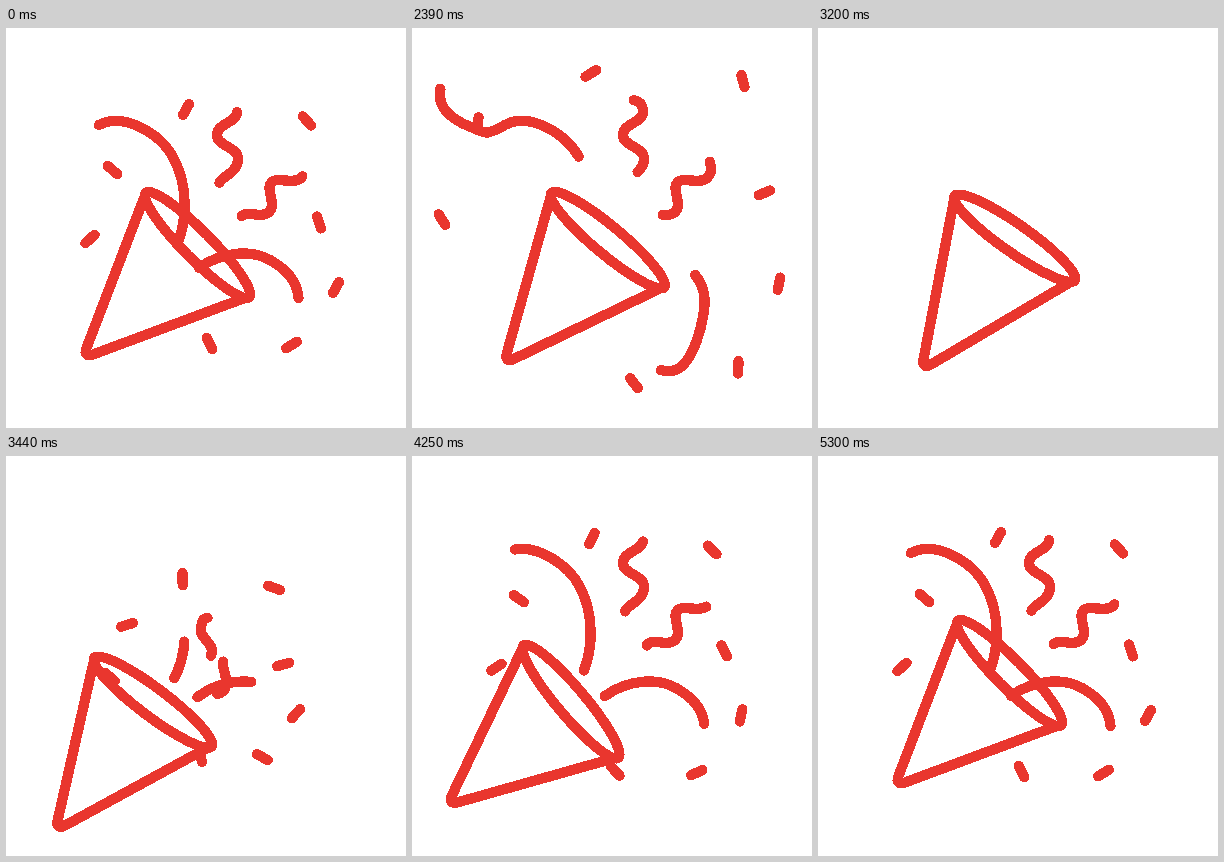
An HTML page for the animation above (5.36 s loop, 400 by 400 pixels).

```html
<!DOCTYPE html>
<html lang="en">
<head>
<meta charset="utf-8">
<title>Party popper</title>
<style>
  html, body { margin: 0; width: 100%; height: 100%; overflow: hidden; background: #fff; }
  svg { display: block; width: 100vw; height: 100vh; shape-rendering: crispEdges; }
  svg * { fill: none; stroke: #e9362e; stroke-width: 10.3; stroke-linecap: round; stroke-linejoin: round; }
</style>
</head>
<body>
<svg id="stage" viewBox="0 0 400 400">
  <g id="cone">
    <path d="M138 170 L80.5 320 C78 326 81 328.8 87 326.5 L240 269.5"/>
    <ellipse cx="191.5" cy="217" rx="73.5" ry="14" transform="rotate(45.2 191.5 217)"/>
  </g>
</svg>
<script>
const LOOP = 5360, START = 2000, FIRE = 3250;
const MUZZLE = [166, 252];
const stage = document.getElementById('stage');
const cone = document.getElementById('cone');

const clamp = (v, lo, hi) => Math.min(hi, Math.max(lo, v));
const mix = (a, b, u) => a + (b - a) * u;
const smooth = (t, from, to) => {
  const u = clamp((t - from) / (to - from), 0, 1);
  return u * u * (3 - 2 * u);
};

// Smooth monotone interpolation through [time, value] keys
function track(keys) {
  const rise = keys.slice(1).map(([t, v], i) => (v - keys[i][1]) / (t - keys[i][0]));
  const slope = keys.map((_, i) => {
    const a = rise[i - 1], b = rise[i];
    return a * b > 0 ? 2 * a * b / (a + b) : 0;
  });
  return t => {
    if (t <= keys[0][0]) return keys[0][1];
    const i = keys.findIndex(k => k[0] > t) - 1;
    if (i < 0) return keys[keys.length - 1][1];
    const [t0, v0] = keys[i], [t1, v1] = keys[i + 1];
    const h = t1 - t0, u = (t - t0) / h, w = 1 - u;
    return v0 * w * w * (1 + 2 * u) + v1 * u * u * (3 - 2 * u)
      + h * u * w * (slope[i] * w - slope[i + 1] * u);
  };
}

function add(tag, attrs) {
  const el = document.createElementNS('http://www.w3.org/2000/svg', tag);
  for (const name in attrs) el.setAttribute(name, attrs[name]);
  return stage.appendChild(el);
}

const show = (el, on) => { el.style.visibility = on ? 'visible' : 'hidden'; };

// Cone: time, dx, dy, degrees for aim, recoil and return
const pose = [
  [2010, 0, 0, 0], [2750, 15, -3, -10.2], [3160, 15, -3, -10.2],
  [3440, -39, 34, -8.2], [3850, -49, 35.5, 6.5], [5000, 0, 0, 0]
];
const [coneX, coneY, coneTurn] = [1, 2, 3].map(c => track(pose.map(k => [k[0], k[c]])));

// Distance still to go after the shot, 1 being the early burst
const landing = track([[FIRE, 4], [3440, 1], [3920, 0.145], [4450, 0]]);

// Streamers slide along fixed paths; [tail, head] points at rest and in the burst
const streamers = [
  {
    d: 'M163 232 Q170 219 172 214 C181 192 182 158 168 131 S116 84 93 97 72 103 62 100 28 86 28 68 34 48 42 41',
    rest: [[172, 214], [93, 97]], burst: [[168, 222], [179, 186]], leave: [62, 100], pace: 0.7
  },
  {
    d: 'M189 243 L193 240 C215 224 245 221 264 232 S291 254 292.5 270 282 343 258 343 234 330 234 324',
    rest: [[193, 240], [292.5, 270]], burst: [[191, 241], [245, 227]], leave: [258, 343], pace: 0.9
  },
  {
    d: 'M205 200 C210 186 193 184 195 172 S198 164 201 162 211 160 214 154 232 144 232 131 211 119 211 107 231 95 231 84 224 73 218 71',
    rest: [[214, 155], [231, 85]], burst: [[205, 200], [201, 162]], leave: [222, 119], pace: 1.2
  },
  {
    d: 'M211 238 C222 236 221 226 219 218 S216 208 217 206 226 202 230 197 234 188 239 186 258 191 264 183 260 162 265 155 288 157 295 150 298 137 297 130',
    rest: [[235, 188], [296, 149]], burst: [[211, 238], [217, 206]], leave: [265, 168], pace: 1
  }
].map(({ d, rest, burst, leave, pace }) => {
  const el = add('path', { d });
  const total = el.getTotalLength();
  const along = ([x, y]) => {
    let best = 0, gap = Infinity;
    for (let n = 0; n <= total; n += 0.5) {
      const p = el.getPointAtLength(n), g = Math.hypot(p.x - x, p.y - y);
      if (g < gap) { gap = g; best = n; }
    }
    return best;
  };
  const ends = rest.map(along), early = burst.map(along);
  const tailOut = track([[START, ends[0]], [2750, along(leave)], [3150, total]]);
  const span = t => {
    if (t < FIRE) return [tailOut(t), mix(ends[1], total, smooth(t, START, 2560))];
    const left = landing(t) ** pace;
    return ends.map((end, i) => Math.max(0, mix(end, early[i], left)));
  };
  return { el, total, span };
});

// Confetti: resting x, y, degrees; spin; where it leaves to
const bits = [
  [180, 81.5, -61, 30, 178, 20],
  [301, 93, 48, 28, 352, 25],
  [106.5, 142, 41, 59, 37, 63],
  [84, 211, -42, -82, -8, 178],
  [313, 194.5, 72, 88, 380, 144],
  [330, 259.5, 119, 167, 393, 253],
  [285.5, 317, -31, -59, 355, 355],
  [203.5, 315.5, 65, 171, 235, 383]
].map(bit => ({ bit, el: add('line', { x1: -6.2, x2: 6.2 }) }));

function placeBit([x, y, angle, spin, exitX, exitY], t) {
  if (t < FIRE) {
    const u = smooth(t, START, 2700);
    return [mix(x, exitX, u), mix(y, exitY, u), angle + spin * 1.66 * u];
  }
  const left = landing(t), u = left * 0.245;
  return [mix(x, MUZZLE[0], u), mix(y, MUZZLE[1], u), angle - spin * left ** 0.6];
}

function draw(t) {
  cone.setAttribute('transform',
    `translate(${coneX(t)} ${coneY(t)}) rotate(${coneTurn(t)} 155 253)`);

  for (const { el, total, span } of streamers) {
    const [tail, head] = span(t);
    show(el, head - tail > 0.5);
    el.setAttribute('stroke-dasharray', `${Math.max(head - tail, 0.1)} ${total * 2}`);
    el.setAttribute('stroke-dashoffset', -tail);
  }

  const scale = t < FIRE ? 1 - smooth(t, 2950, 3150) : 1;
  for (const { el, bit } of bits) {
    const [x, y, angle] = placeBit(bit, t);
    show(el, scale > 0);
    el.setAttribute('transform', `translate(${x} ${y}) rotate(${angle}) scale(${scale})`);
  }
}

const begin = performance.now();
function tick() {
  draw((performance.now() - begin) % LOOP);
  requestAnimationFrame(tick);
}
tick();
</script>
</body>
</html>
```
